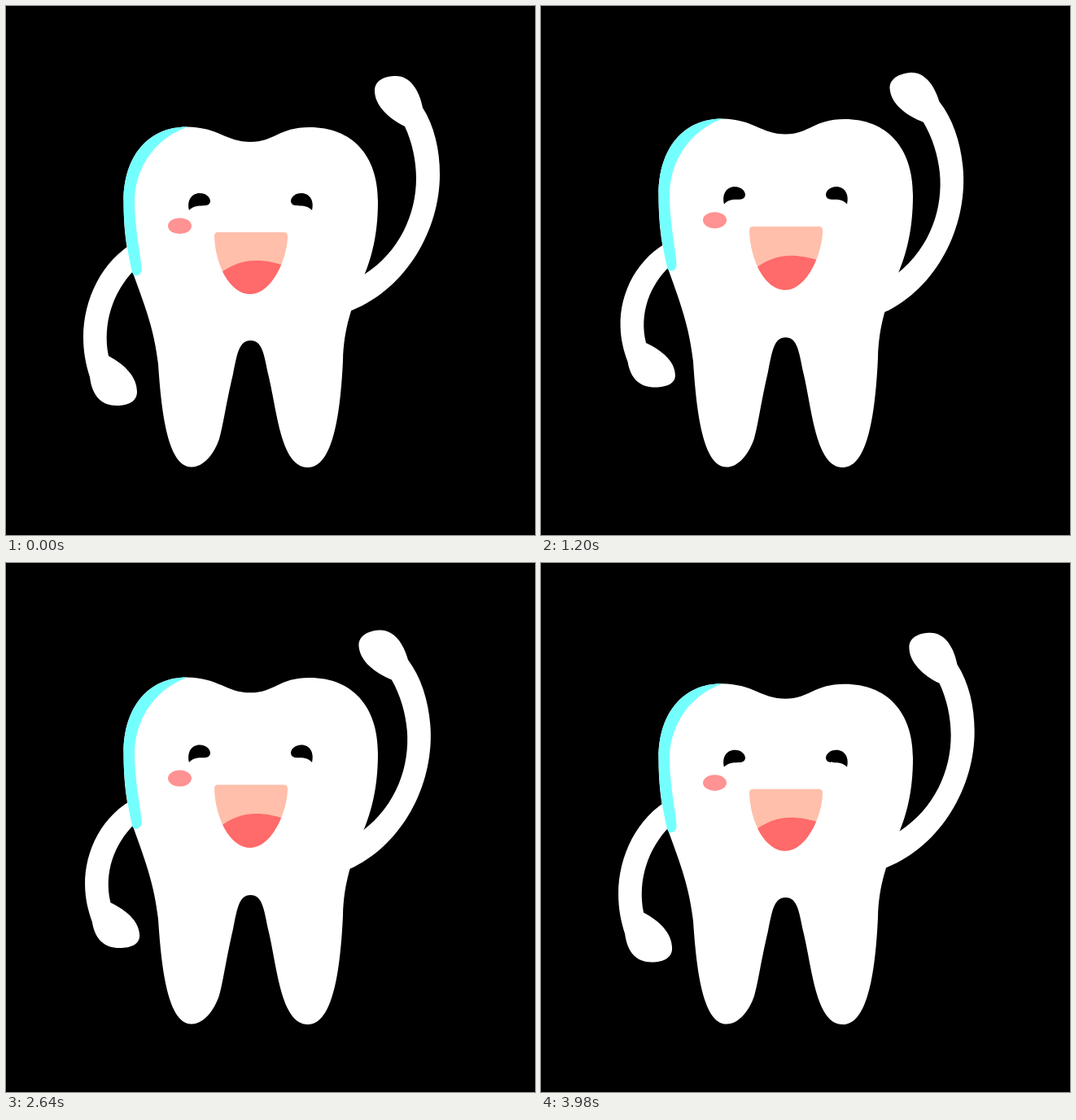
An HTML page with a canvas for the animation above (4 s loop, 650 by 650 pixels).

```html
<!DOCTYPE html>
<html lang="en">
<head>
<meta charset="utf-8">
<title>Waving tooth</title>
<style>
html, body { margin: 0; width: 100%; height: 100%; overflow: hidden; background: #000; }
canvas { display: block; width: 650px; height: 650px; }
</style>
</head>
<body>
<canvas id="stage" width="650" height="650"></canvas>
<script>
const ctx = document.getElementById('stage').getContext('2d');
const HALF = 1000, STEP = 20;
const GROUND = 567, AXIS = 300.5;

const tooth = new Path2D(
  'M300.5 167 C330 167 335 149 373 149 C425 149 457 183 457 240 ' +
  'C457 282 449 310 439 334 C425 370 415 395 414 436 ' +
  'C411 500 402 567 371 567 C337 567 333 495 322 452 ' +
  'C317 428 315 411 300.5 411 C286 411 284 428 279 452 ' +
  'C270 490 267 515 262 532 C256 550 243 566.5 228 566.5 ' +
  'C199 566.5 191 500 187 440 ' +
  'C182 398 172 372 157 331 C149 305 144.5 280 144.5 240 ' +
  'C144.5 183 176 148.5 222 148.5 C262 149 270 167 300.5 167Z');
const shine = new Path2D(
  'M222 148.5 C176 148.5 144.5 183 144.5 240 C144.5 275 149 300 155 327 ' +
  'C156 333 165 333 166.5 325 C167 312 158 275 158 240 ' +
  'C158 205 178 165 222 149Z');
const eye = new Path2D(
  'M225 251 C222 239 228 230 238 230 C246 230 251 235 251 240 ' +
  'C250 246 245 245 240 245.5 C233 245.5 229 247 225 251Z');
const mouth = new Path2D(
  'M260 278 H342 Q346 278 346 283 C346 309 327 354 300 354 ' +
  'C275 354 257 318 256 283 Q256 278 260 278Z');
const tongue = new Path2D('M262 329 C285 312 308 308 342 319 V360 H262Z');
const raisedArm = new Path2D(
  'M512 125 C526 147 533 176 533 207 C533 275 492 347 425 374 ' +
  'L405 380 L400 345 L440 330 C484 302 504 255 504 212 ' +
  'C504 190 499 167 490 148 C470 138 453 122 453 104 ' +
  'C453 91 466 86 479 86 C497 86 508 104 512 125Z');
const restArm = new Path2D(
  'M160 289 C118 312 95 360 95 407 C95 425 98 440 103 456 ' +
  'C106 480 118 491 136 491 C150 491 161 486 161 474 ' +
  'C161 455 145 440 126 430 C118 390 132 351 157 325 L175 308Z');

function fill(path, color) {
  ctx.fillStyle = color;
  ctx.fill(path);
}

function group(paint) {
  ctx.save();
  paint();
  ctx.restore();
}

function drawRaisedArm(k) {
  ctx.translate(425, 352);
  ctx.rotate(-k * 7 * Math.PI / 180);
  ctx.translate(-425, -352);
  fill(raisedArm, '#fff');
}

// The resting arm shortens and leans a little toward the body.
function drawRestArm(k) {
  ctx.translate(0, 277);
  ctx.transform(1, 0, 0.025 * k, 1 - 0.131 * k, 0, 0);
  ctx.translate(0, -277);
  fill(restArm, '#fff');
}

function drawTooth(k) {
  ctx.translate(0, GROUND);
  ctx.scale(1, 1 + 0.03 * k);
  ctx.translate(0, -GROUND);
  fill(tooth, '#fff');
  fill(shine, '#74ffff');

  fill(eye, '#000');
  group(() => {
    ctx.translate(2 * AXIS, 0);
    ctx.scale(-1, 1);
    fill(eye, '#000');
  });

  ctx.beginPath();
  ctx.ellipse(213.5, 270.3, 14.5, 9.8, 0, 0, 2 * Math.PI);
  ctx.fillStyle = '#ff9292';
  ctx.fill();

  fill(mouth, '#ffbfaa');
  ctx.clip(mouth);
  fill(tongue, '#ff6a6a');
}

function render(time) {
  const t = Math.floor(time / STEP) * STEP % (2 * HALF);
  const k = 1 - Math.abs(1 - t / HALF);
  ctx.fillStyle = '#000';
  ctx.fillRect(0, 0, 650, 650);
  group(() => drawRaisedArm(k));
  group(() => drawRestArm(k));
  group(() => drawTooth(k));
}

let start;
function tick(now) {
  if (start === undefined) start = now;
  render(now - start);
  requestAnimationFrame(tick);
}
render(0);
requestAnimationFrame(tick);
</script>
</body>
</html>
```
